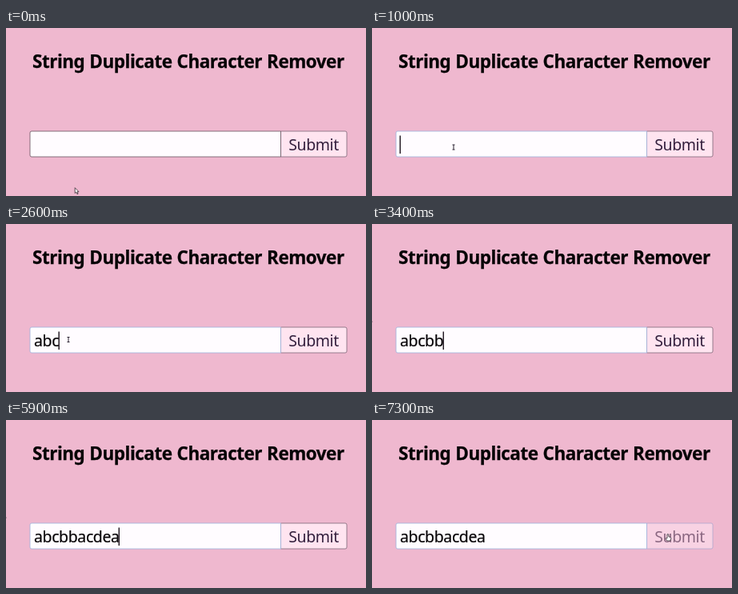
An HTML page that plays this animation: 450x210 px, repeating every 7.4 s.

```html
<!DOCTYPE html>
<html lang="en">
<head>
<meta charset="utf-8">
<title>String Duplicate Character Remover</title>
<style>
  html, body { margin: 0; width: 100%; height: 100%; overflow: hidden; background: #efb8cf; }
  svg { display: block; width: 450px; height: 210px; }
  text { font-family: Ubuntu, "Noto Sans", "Open Sans", sans-serif; }
  .title { font-size: 22.5px; font-weight: 700; letter-spacing: -.022em; word-spacing: .7px;
    fill: #050305; stroke: #050305; stroke-width: .25px; }
  .label { font-size: 19.5px; letter-spacing: -.02em; }
  #typed { fill: #080508; stroke: #080508; stroke-width: .2px; }
  .pointer { fill: #fff; stroke: #33262f; stroke-width: .8px; }
</style>
</head>
<body>
<svg viewBox="0 0 450 210">
  <rect width="450" height="210" fill="#efb8cf"/>
  <text class="title" x="33" y="50">String Duplicate Character Remover</text>

  <path id="button" d="M343.5 129H424Q426 129 426 131V159Q426 161 424 161H343.5Z" stroke-width=".8"/>
  <path id="field" d="M343.5 129H32Q30 129 30 131V159Q30 161 32 161H343.5Z" fill="#fffcff" stroke-width=".8"/>
  <text id="submit" class="label" x="353.2" y="153">Submit</text>
  <text id="typed" class="label" x="35" y="153"></text>
  <rect id="caret" y="134.5" width="1.4" height="22.5" fill="#1c121c"/>

  <path id="arrow" class="pointer" d="M.2 .2V7L1.8 5.6L3 8.2L4.1 7.7L3 5.2H5Z"/>
  <path id="beam" d="M-1.5 -3H1.5M-1.5 3H1.5M0 -3V3" stroke="#2a2230"/>
  <path id="hand" class="pointer" d="M-1 -4Q0 -5 .8 -4V-1.2L3 -.5Q4 0 3.7 1.5L3 4H-1.2L-3 1.2Q-3 0 -1 1Z"/>
</svg>
<script>
const LOOP = 7400, STEP = 100;
const WORD = "abcbbacdea";
const FOCUS = 800, FIRST_KEY = 1400, KEY_GAP = 500, CARET_END = 6700, HOVER = 6850;

// the pointer rests at each stop and glides to the next
const STOPS = [
  { x: 86, y: 199.5, arrive: 0, leave: 200 },
  { x: 102, y: 149, arrive: 800, leave: 1000 },
  { x: 78, y: 144.5, arrive: 1600, leave: 2600 },
  { x: -4.7, y: 117, arrive: 3300, leave: 6000 },
  { x: 329, y: 106, arrive: 6500, leave: 6600 },
  { x: 370, y: 147, arrive: 7100, leave: LOOP }
];

const el = Object.fromEntries([...document.querySelectorAll("[id]")].map(n => [n.id, n]));
const clamp = v => Math.max(0, Math.min(1, v));
const mix = (a, b, k) => a + (b - a) * k;
const ease = k => k * k * (3 - 2 * k);
const mixColor = (a, b, k) => `rgb(${a.map((v, i) => Math.round(mix(v, b[i], k)))})`;

function set(node, attrs) {
  for (const name in attrs) node.setAttribute(name, attrs[name]);
}

function pointerAt(t) {
  const i = STOPS.findLastIndex(stop => stop.arrive <= t);
  const from = STOPS[i], to = STOPS[i + 1] || from;
  const k = to === from ? 0 : ease(clamp((t - from.leave) / (to.arrive - from.leave)));
  return [mix(from.x, to.x, k), mix(from.y, to.y, k)];
}

function drawPointer(x, y) {
  const inRow = y > 129 && y < 161 && x > 30;
  const kind = !inRow ? "arrow" : x < 343 ? "beam" : "hand";
  for (const name of ["arrow", "beam", "hand"]) {
    set(el[name], { visibility: name === kind ? "visible" : "hidden", transform: `translate(${x} ${y})` });
  }
}

function render(t) {
  const focused = t >= FOCUS;
  const hover = clamp((t - HOVER) / 200);
  const count = Math.max(0, Math.floor((t - FIRST_KEY) / KEY_GAP) + 1);
  el.typed.textContent = WORD.slice(0, count);
  const width = count ? el.typed.getComputedTextLength() : 0;
  set(el.caret, {
    x: 34.5 + width * .995,
    visibility: focused && t < CARET_END ? "visible" : "hidden"
  });
  set(el.field, { stroke: focused ? "#9eb0db" : "#66525f" });
  set(el.button, {
    fill: mixColor([255, 228, 240], [248, 210, 227], hover),
    stroke: mixColor([125, 102, 118], [174, 166, 205], hover)
  });
  set(el.submit, { fill: mixColor([52, 32, 62], [139, 104, 130], hover) });
  drawPointer(...pointerAt(t));
}

const start = performance.now();
function tick() {
  const t = (performance.now() - start) % LOOP;
  render(Math.floor(t / STEP) * STEP);
  requestAnimationFrame(tick);
}
tick();
</script>
</body>
</html>
```
